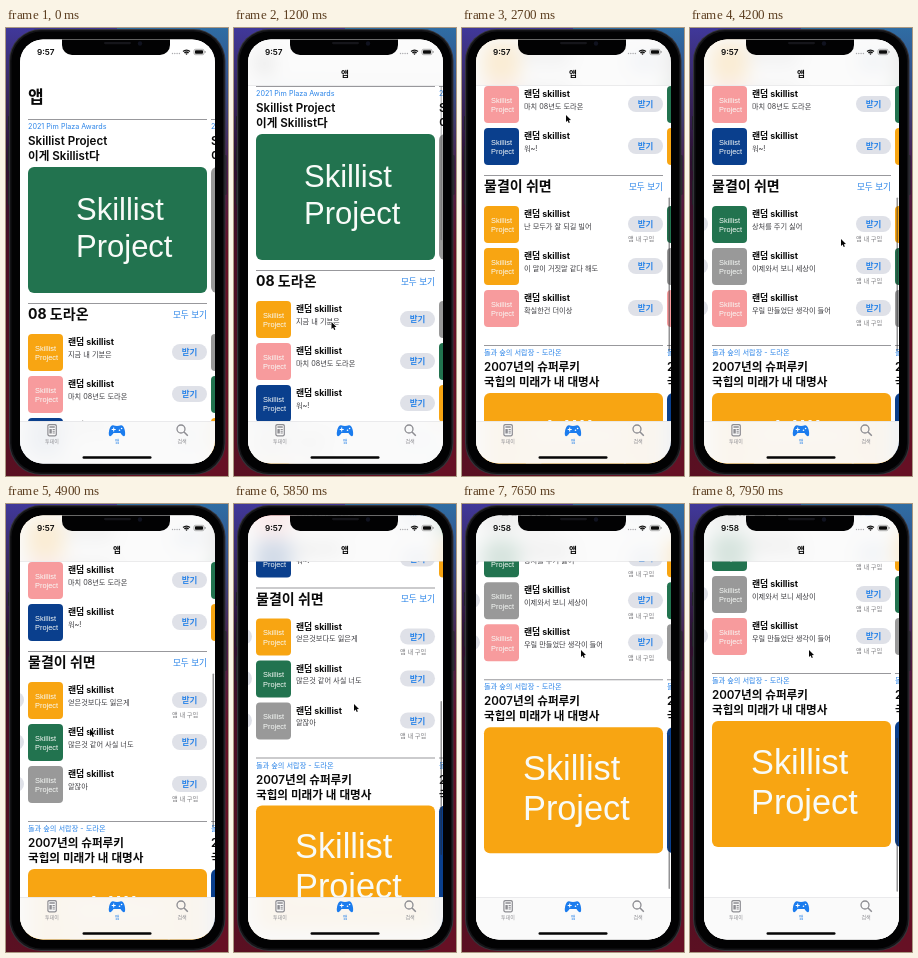
Recreate the animation shown at these times as an HTML page with a canvas. Size 222 px wide and 448 px high, loop 8000 ms.

```html
<!DOCTYPE html>
<html lang="ko">
<head>
<meta charset="utf-8">
<style>
html, body { margin: 0; width: 100%; height: 100%; overflow: hidden; background: #160a18; }
canvas { display: block; width: 222px; height: 448px; }
</style>
</head>
<body>
<canvas id="stage"></canvas>
<script>
const W = 222, H = 448, LOOP = 8000, PAGE = 183;
const UI = 'Inter, "Noto Sans CJK KR", "Noto Sans CJK", sans-serif';
const ART = '"Liberation Sans", Arial, sans-serif';
const BLUE = '#2a84e8', GREEN = '#22734f', ORANGE = '#f8a512',
      PINK = '#f79b9d', NAVY = '#0a3f8d', GRAY = '#999999';

const dpr = window.devicePixelRatio || 1;
const stage = document.getElementById('stage');
const layer = document.createElement('canvas');
for (const c of [stage, layer]) { c.width = W * dpr; c.height = H * dpr; }
const out = stage.getContext('2d');
const page = layer.getContext('2d');
let g = out;

// Motion
const clamp = x => Math.max(0, Math.min(1, x));
const smooth = p => p * p * (3 - 2 * p);
const glide = p => 1 - (1 - p) ** 3;

// Each step is [begin, end, target].
function track(t, value, steps, ease) {
  for (const [a, b, v] of steps) value += (v - value) * ease(clamp((t - a) / (b - a)));
  return value;
}
const scrollAt = t => track(t, 0,
  [[1150, 1850, 162], [2150, 2700, 290], [5350, 6150, 357], [7250, 7950, 438]], glide);
const swipeAt = t => track(t, 0,
  [[3000, 3600, PAGE], [4200, 4700, 2 * PAGE], [6450, 7170, PAGE]], smooth);
const cursorX = t => track(t, 226,
  [[700, 1000, 98], [1150, 1500, 89], [2150, 2450, 104], [2720, 3000, 167], [3000, 3300, 90],
   [3900, 4180, 151], [4250, 4600, 84], [4900, 5150, 120], [6200, 6440, 72],
   [6450, 6800, 154], [7130, 7300, 119]], smooth);
const cursorY = t => track(t, 330,
  [[700, 1000, 300], [1150, 1550, 163], [2150, 2450, 87], [2720, 3000, 212], [3900, 4180, 211],
   [4250, 4700, 225], [4900, 5150, 262], [5350, 5700, 200], [6200, 6440, 188],
   [7100, 7260, 212], [7270, 7600, 146]], smooth);

// Drawing helpers
function box(x, y, w, h, r, fill) {
  g.beginPath();
  g.roundRect(x, y, w, h, r);
  g.fillStyle = fill;
  g.fill();
}
function disc(x, y, r, fill) {
  g.beginPath();
  g.arc(x, y, r, 0, Math.PI * 2);
  g.fillStyle = fill;
  g.fill();
}
function stroke(path, color, width) {
  g.beginPath();
  path();
  g.strokeStyle = color;
  g.lineWidth = width;
  g.stroke();
}
function text(str, x, mid, size, { weight = 400, color = '#0a0a0a', align = 'left', font = UI } = {}) {
  g.font = `${weight} ${size}px ${font}`;
  g.textAlign = align;
  g.fillStyle = color;
  g.fillText(str, x, mid + size * 0.36);
}
function artText(x, base, size, pitch) {
  g.font = `${size}px ${ART}`;
  g.textAlign = 'left';
  g.fillStyle = '#f8fbf8';
  g.fillText('Skillist', x, base);
  g.fillText('Project', x, base + pitch);
}
const rule = (x, y) => box(x, y, 179, 1, 0, '#98989c');

// Content
const FEATURES = [
  { y: 91, next: GRAY, tag: '2021 Pim Plaza Awards', title: ['Skillist Project', '이게 Skillist다'],
    color: GREEN, art: [48, 53, 31, 36.5] },
  { y: 607, next: NAVY, tag: '돌과 숲의 서랍장 - 도라온', title: ['2007년의 슈퍼루키', '국힙의 미래가 내 대명사'],
    color: ORANGE, art: [39, 52.5, 34.3, 40.5] }
];
// Row: [color, caption, in-app purchase]
const LISTS = [
  { y: 275, title: '08 도라온', pages: [
    [[ORANGE, '지금 내 기분은'], [PINK, '마치 08년도 도라온'], [NAVY, '워~!']],
    [[GRAY, ''], [GREEN, ''], [ORANGE, '']]
  ] },
  { y: 437, title: '물결이 쉬면', pages: [
    [[ORANGE, '난 모두가 잘 되길 빌어', 1], [ORANGE, '이 말이 거짓말 같다 해도'], [PINK, '확실한건 더이상']],
    [[GREEN, '상처를 주기 싫어', 1], [GRAY, '이제와서 보니 세상이', 1], [PINK, '우릴 만들었단 생각이 들어', 1]],
    [[ORANGE, '얻은것보다도 잃은게', 1], [GREEN, '많은것 같어 사실 너도'], [GRAY, '알잖아', 1]]
  ] }
];

function drawFeature(f) {
  [[22, f.color], [22 + PAGE, f.next]].forEach(([x, color]) => {
    rule(x, f.y);
    text(f.tag, x, f.y + 7.5, 7.2, { color: BLUE });
    f.title.forEach((s, i) => text(s, x, f.y + 22 + i * 15, 11.6, { weight: 600 }));
    box(x, f.y + 48, 179, 126, 6, color);
    const [dx, dy, size, pitch] = f.art;
    artText(x + dx, f.y + 48 + dy, size, pitch);
  });
}

function drawRow([color, caption, paid], x, y) {
  box(x, y, 35, 37, 4, color);
  artText(x + 7, y + 17, 7.4, 9.2);
  text('랜덤 skillist', x + 40, y + 8, 8.8, { weight: 700 });
  text(caption, x + 40, y + 20, 7.2, { color: '#3c3c40' });
  box(x + 144, y + 10, 35, 16, 8, '#dfe1e8');
  text('받기', x + 161.5, y + 18, 8.5, { weight: 600, color: BLUE, align: 'center' });
  if (paid) text('앱 내 구입', x + 144, y + 33, 6.2, { color: '#77777b' });
}

function drawList(list, swipe) {
  rule(22, list.y);
  text(list.title, 22, list.y + 11, 14, { weight: 700 });
  text('모두 보기', 201, list.y + 11.5, 8.6, { color: BLUE, align: 'right' });
  list.pages.forEach((rows, p) => {
    const x = 22 + p * PAGE - swipe;
    if (x > -PAGE && x < 212) rows.forEach((row, i) => drawRow(row, x, list.y + 31 + i * 42));
  });
}

function drawContent(t, scroll) {
  g = page;
  g.setTransform(dpr, 0, 0, dpr, 0, 0);
  g.fillStyle = '#fff';
  g.fillRect(0, 0, W, H);
  g.translate(0, -scroll);
  text('앱', 22, 69, 17, { weight: 700 });
  FEATURES.forEach(drawFeature);
  drawList(LISTS[0], 0);
  drawList(LISTS[1], swipeAt(t));
  g = out;
}

// Frosted strip over the content
function frost(y, h, tint) {
  g.save();
  g.beginPath();
  g.rect(13, y, 197, h);
  g.clip();
  g.filter = `blur(${9 * dpr}px)`;
  g.drawImage(layer, 0, 0, W, H);
  g.filter = 'none';
  g.fillStyle = tint;
  g.fillRect(13, y, 197, h);
  g.restore();
}

function drawStatus(t) {
  text(t < 6250 ? '9:57' : '9:58', 31, 24, 8.2, { weight: 600 });
  for (let i = 0; i < 4; i++) disc(166.5 + i * 2.3, 25.5, 0.7, '#a9a9ad');
  for (let i = 1; i < 4; i++)
    stroke(() => g.arc(180.5, 27, i * 1.9 - 0.9, -Math.PI * 0.75, -Math.PI * 0.25), '#111', 1.4);
  stroke(() => g.roundRect(188, 21.3, 10, 5.4, 1.6), '#777', 0.6);
  box(189, 22.2, 8, 3.6, 0.8, '#0a0a0a');
  box(198.7, 23, 0.8, 2, 0.4, '#777');
}

function drawTabs() {
  const gray = '#8d8d92';
  box(13, 393, 197, 0.5, 0, '#dcdcdf');
  box(41.3, 396, 9.6, 12.4, 1.8, gray);
  box(42.5, 397.2, 7.2, 10, 1, '#f8f8f8');
  box(43.4, 398.3, 5.4, 1.5, 0.3, gray);
  box(43.4, 401, 2.4, 4.6, 0.3, gray);
  for (let i = 0; i < 3; i++) box(46.6, 401 + i * 1.8, 2.2, 0.9, 0, gray);

  g.beginPath();
  g.moveTo(107, 397.2);
  g.quadraticCurveTo(111, 398.8, 115, 397.2);
  g.bezierCurveTo(118, 397, 119.8, 404, 119, 407.3);
  g.bezierCurveTo(118, 410, 116, 407, 114.5, 405);
  g.lineTo(107.5, 405);
  g.bezierCurveTo(106, 407, 104, 410, 103, 407.3);
  g.bezierCurveTo(102.2, 404, 104, 397, 107, 397.2);
  g.fillStyle = '#1b7cee';
  g.fill();
  box(105.7, 401, 4, 1, 0, '#fff');
  box(107.2, 399.5, 1, 4, 0, '#fff');
  disc(113.5, 402.3, 0.8, '#fff');
  disc(115.6, 400.5, 0.8, '#fff');

  stroke(() => g.arc(175, 401, 4, 0, Math.PI * 2), gray, 1.3);
  stroke(() => { g.moveTo(178, 404); g.lineTo(181.8, 407.8); }, gray, 1.5);

  text('투데이', 46, 413.3, 5, { color: gray, align: 'center' });
  text('앱', 111, 413.3, 5, { color: BLUE, align: 'center' });
  text('검색', 176, 413.3, 5, { color: gray, align: 'center' });
  box(76.5, 428.3, 69, 2.5, 1.25, '#050505');
}

function drawBackdrop() {
  const sides = [
    ['#40389a', '#3a2a68', '#2c1030', '#4a0e24', '#5a1022'],
    ['#2f6da4', '#34508a', '#4a2150', '#641026', '#661024']
  ];
  sides.forEach((colors, i) => {
    const fade = g.createLinearGradient(0, 0, 0, H);
    [0, 0.12, 0.3, 0.5, 1].forEach((p, k) => fade.addColorStop(p, colors[k]));
    g.fillStyle = fade;
    g.fillRect(i * W / 2, 0, W / 2, H);
  });
}

function drawPhone() {
  [[88, 14], [118, 25], [152, 25]].forEach(([y, h]) => box(2, y, 3, h, 1, '#23232a'));
  box(217.5, 127, 3, 40, 1, '#23232a');
  box(3, 1, 216.5, 446, 32, '#34343a');
  box(4, 2, 214.5, 444, 31, '#131316');
  box(5.5, 3.5, 211.5, 441, 30, '#020203');
}

function drawCursor(x, y) {
  g.save();
  g.translate(x, y);
  g.scale(0.82, 0.82);
  g.beginPath();
  [[0, 0], [0, 8.6], [2, 6.8], [3.3, 9.8], [4.7, 9.2], [3.4, 6.3], [6.1, 6.2]]
    .forEach(p => g.lineTo(...p));
  g.closePath();
  g.lineJoin = 'round';
  g.strokeStyle = '#fff';
  g.lineWidth = 1.4;
  g.stroke();
  g.fillStyle = '#050505';
  g.fill();
  g.restore();
}

function drawIndicator(t, scroll) {
  const alpha = 0.5 * clamp((t - 1150) / 100);
  if (alpha > 0) box(206.5, 44 + scroll * 0.433, 1.5, 154, 0.75, `rgba(40,40,45,${alpha})`);
}

function draw(t) {
  const scroll = scrollAt(t);
  drawContent(t, scroll);
  g.setTransform(dpr, 0, 0, dpr, 0, 0);
  drawBackdrop();
  drawPhone();

  g.save();
  g.beginPath();
  g.roundRect(14, 11.5, 195, 424, 23);
  g.clip();
  g.drawImage(layer, 0, 0, W, H);
  drawIndicator(t, scroll);
  const bar = clamp((scroll - 14) / 10);
  if (bar > 0) {
    g.globalAlpha = bar;
    frost(11, 46, 'rgba(250,250,250,.81)');
    box(13, 57, 197, 0.5, 0, '#d8d8da');
    text('앱', 111, 45.5, 8.5, { weight: 700, align: 'center' });
    g.globalAlpha = 1;
  } else {
    box(13, 11, 197, 46, 0, '#fff');
  }
  frost(393, 43, 'rgba(250,250,250,.95)');
  drawTabs();
  drawStatus(t);
  box(56, 0, 108, 27, [0, 0, 10, 10], '#020203');
  g.restore();

  box(98, 14, 27, 2.2, 1.1, '#15151a');
  disc(134, 15.5, 2.2, '#10121f');
  if (t >= 700) drawCursor(cursorX(t), cursorY(t));
}

const start = performance.now();
function tick() {
  draw((performance.now() - start) % LOOP);
  requestAnimationFrame(tick);
}
tick();
</script>
</body>
</html>
```
